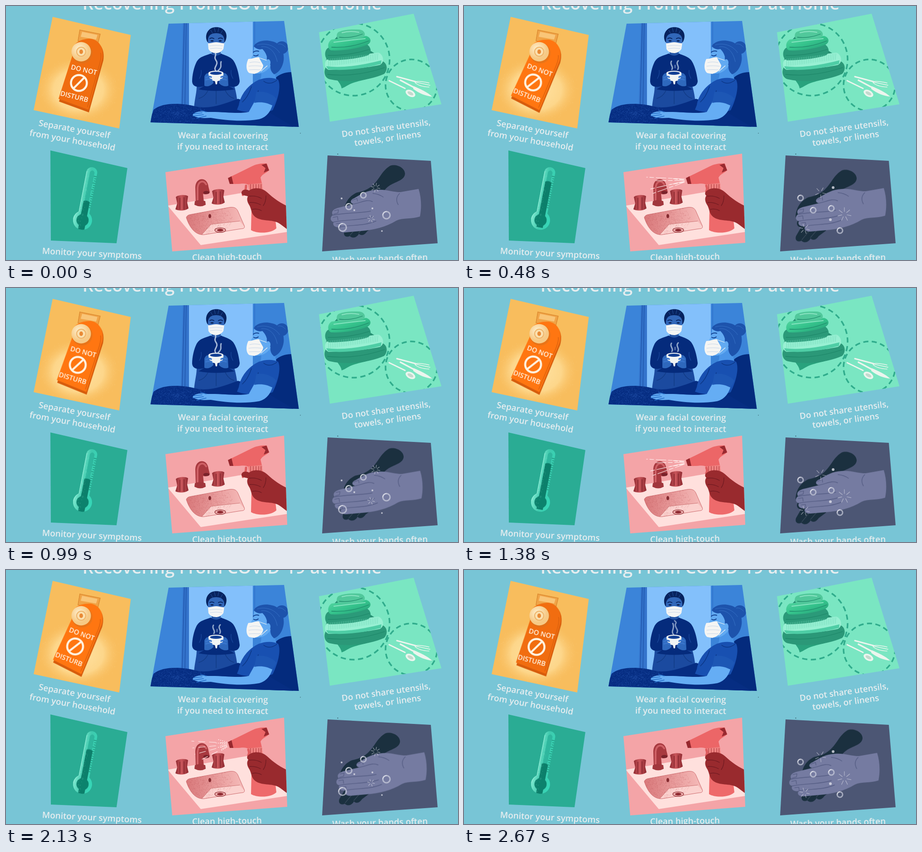
These frames come from a looping animation (998 by 561 pixels, 2.7 s). An HTML page:

```html
<!DOCTYPE html>
<html lang="en">
<head>
<meta charset="utf-8">
<title>Recovering at Home</title>
<style>
html, body { margin: 0; width: 100%; height: 100%; overflow: hidden; background: #78c5d6; }
svg { display: block; width: 100vw; height: 100vh; }
text { font-family: "Open Sans", "Noto Sans", sans-serif; text-anchor: middle; }
.cap { font-size: 18.9px; font-weight: 600; fill: #e6edef; }
.title { font-size: 38.3px; font-weight: 600; fill: #e6edef; }
.sign text { font-size: 15px; font-weight: 600; fill: #fff3e2; }
.line { fill: none; stroke-linecap: round; stroke-linejoin: round; }

.sign, .front, .back, .level, .dash, .third, .rest, .half, .early, .late {
  animation: 900ms infinite;
}
.sign { transform-origin: 166px 101px; animation-name: swing; animation-timing-function: steps(10); }
.face { animation: 900ms infinite glow; }
.front { animation-name: front; animation-timing-function: steps(15); }
.back { animation-name: back; animation-timing-function: steps(15); }
.level { animation-name: level; animation-timing-function: steps(15); }
.dash { stroke-dasharray: .6 .4; animation-name: dash; animation-timing-function: steps(30); }
.third, .rest, .half, .early, .late { animation-timing-function: step-end; }
.third { animation-name: third; }
.rest { animation-name: rest; }
.half { animation-name: half; }
.early { animation-name: early; animation-delay: -600ms; }
.late { animation-name: late; animation-delay: -600ms; }
.d1 { animation-delay: -600ms; }
.d2 { animation-delay: -300ms; }
.off { animation-delay: -450ms; }

@keyframes swing { 33.333%, 66.667% { transform: rotate(7deg); } }
@keyframes glow { 0%, to { fill: #f06d10; } 12%, 88% { fill: #ff7611; } }
@keyframes front { 50% { transform: translate(17px, -2px); } }
@keyframes back { 50% { transform: translate(-15px, 11px); } }
@keyframes level { 50% { transform: translateY(-47px); } }
@keyframes dash { to { stroke-dashoffset: -1; } }
@keyframes third { 0% { opacity: 1; } 33.333%, to { opacity: 0; } }
@keyframes rest { 0% { opacity: 0; } 33.333%, to { opacity: 1; } }
@keyframes half { 0% { opacity: 1; } 50%, to { opacity: 0; } }
@keyframes early { 0% { opacity: 1; } 10%, to { opacity: 0; } }
@keyframes late { 0% { opacity: 0; } 10% { opacity: 1; } 33.333%, to { opacity: 0; } }
</style>
</head>
<body>
<svg viewBox="0 0 998 561" preserveAspectRatio="none">
<defs>
  <clipPath id="c1"><polygon id="p1" points="103,24 275.500,64 250,270.500 61,230"/></clipPath>
  <clipPath id="c2"><polygon id="p2" points="359,39 614,33 646.500,267 319,257"/></clipPath>
  <clipPath id="c3"><polygon id="p3" points="691,58 900,17 961.500,217 715,255.500"/></clipPath>
  <clipPath id="c4"><polygon id="p4" points="98,319 268,358 244,524 99,518"/></clipPath>
  <clipPath id="c5"><polygon id="p5" points="352,367 614,326 621,523 367,542"/></clipPath>
  <clipPath id="c6"><polygon id="p6" points="710,330 938,342 953,524 698,542"/></clipPath>
  <clipPath id="tube"><path id="tubeShape" d="M-12 -107A12 12 0 0 1 12 -107V-17A21 21 0 1 1 -12 -17Z"/></clipPath>
  <clipPath id="basin"><path id="basinShape" d="M398 467C400 462 404 461 410 460L492 445C503 443 509 446 512 453L526 485C528 490 525 492 519 492L438 505C420 507 406 492 398 467Z"/></clipPath>
  <clipPath id="quilt"><path id="quiltShape" d="M315 260L326 229C344 213 387 213 420 222C450 229 482 216 512 205L548 215L640 270Z"/></clipPath>
  <radialGradient id="warm"><stop offset="0" stop-color="#ffe3a4"/><stop offset=".6" stop-color="#fdd68a"/><stop offset="1" stop-color="#f8bd5d" stop-opacity="0"/></radialGradient>
  <radialGradient id="knob" cx=".4" cy=".35"><stop offset="0" stop-color="#fff0cf"/><stop offset="1" stop-color="#f6c985"/></radialGradient>
  <linearGradient id="glass"><stop offset="0" stop-color="#7be8cf"/><stop offset=".45" stop-color="#3fc9ad"/><stop offset="1" stop-color="#35d8b8"/></linearGradient>
  <linearGradient id="bowl"><stop offset="0" stop-color="#d9797b"/><stop offset="1" stop-color="#f6bcba"/></linearGradient>
  <linearGradient id="metal"><stop offset="0" stop-color="#8e2930"/><stop offset=".45" stop-color="#c9565b"/><stop offset="1" stop-color="#8e2930"/></linearGradient>
  <linearGradient id="towel" x2="1" y2="1"><stop offset="0" stop-color="#59d9a5"/><stop offset=".5" stop-color="#35c38c"/><stop offset="1" stop-color="#239b75"/></linearGradient>
</defs>
<rect width="998" height="561" fill="#78c5d6"/>
<text class="title" x="499" y="8">Recovering From COVID-19 at Home</text>

<!-- door sign -->
<use href="#p1" fill="#f8bd5d"/>
<g clip-path="url(#c1)">
  <ellipse cx="160" cy="185" rx="92" ry="74" fill="url(#warm)"/>
  <g id="glowGrain"></g>
  <path d="M163 53L208 62L202 86L159 77Z" fill="#f0a447" stroke="#dc8a31" stroke-width="1.5"/>
  <path d="M168 57L202 64L199 74L165 68Z" fill="#f9c578"/>
  <g class="sign">
    <path d="M117 211L148 112C143 92 154 77 185 75C207 76 219 95 215 120L183 235Z" fill="#d75c0c"/>
    <path class="face" d="M116 205L147 108C143 90 154 74 184 72C205 73 217 92 213 116L182 229Z" fill="#f06d10"/>
    <path class="line" d="M209 104C211 112 208 124 205 134L180 223" stroke="#da600d" stroke-width="1.5"/>
    <text transform="translate(171 146) rotate(13)">DO NOT</text>
    <text transform="translate(149.500 205) rotate(14)">DISTURB</text>
    <g class="line" stroke="#fff3e2" stroke-width="4.500"><circle cx="161" cy="170" r="17.500"/><path d="M173 158L149 182"/></g>
  </g>
  <ellipse cx="168" cy="104" rx="23" ry="23" fill="#d8741f" opacity=".55"/>
  <circle cx="166" cy="101" r="21.500" fill="url(#knob)"/>
  <circle cx="166" cy="101" r="10" fill="#fbe0af" stroke="#eeb469" stroke-width="2"/>
  <ellipse cx="166" cy="101" rx="4" ry="5" fill="#e98a36"/>
</g>

<!-- caregiver and patient -->
<use href="#p2" fill="#3b84d9"/>
<g clip-path="url(#c2)">
  <rect x="404" y="30" width="141" height="200" fill="#83c0fb"/>
  <path d="M391 30H404V224H386Z" fill="#3474cc"/>
  <path class="line" d="M394 30L389 222M398 30L395 222" stroke="#1f56ac" stroke-width="1.5"/>
  <path class="line" d="M549 30V130" stroke="#2f70c8" stroke-width="1.5"/>
  <path d="M421 176C421 195 416 205 415 230H512C511 205 508 190 504 176Z" fill="#1b4a9f"/>
  <path class="line" d="M447 184C442 196 434 202 426 204M483 184C488 196 496 202 503 204M464 186V216" stroke="#123b86" stroke-width="1.5"/>
  <path d="M452 105C440 110 428 111 421 123C415 135 411 152 411 167C412 180 426 180 437 177L425 184C450 189 480 188 505 184L492 177C506 181 515 177 516 166C514 148 508 126 500 118C492 110 482 109 475 105C470 109 458 109 452 105Z" fill="#052b7c"/>
  <path class="line" d="M431 142C432 150 430 154 427 160M497 142C496 150 498 154 501 160" stroke="#1a489c" stroke-width="1.3"/>
  <path d="M454 95H474V106C468 111 459 110 454 106Z" fill="#2556a6"/>
  <path d="M445 80C439 70 442 58 449 52C456 45 473 45 480 52C488 58 489 70 483 80Z" fill="#07235f"/>
  <path d="M446 74C447 64 454 60 464 60C474 60 481 64 482 74C483 92 474 103 464 104C454 103 445 92 446 74Z" fill="#3167b9"/>
  <path class="line" d="M452 53L456 60M460 48L462 57M470 48L468 57M478 54L474 61" stroke="#2c5caa" stroke-width=".8"/>
  <path class="line" d="M450 72Q454 69 459 72M469 72Q474 69 478 72" stroke="#07235f" stroke-width="2"/>
  <path d="M451 77Q455 74 459 77Q455 80 451 77M469 77Q473 74 477 77Q473 80 469 77" fill="#061b4c"/>
  <path d="M446 82C452 83 458 80 464 80C470 80 476 83 482 82L480 95C475 102 469 104 464 104C457 104 450 101 447 95Z" fill="#f4f5f4"/>
  <path class="line" d="M450 88Q464 86 478 88M451 94Q464 92 477 94" stroke="#c6d5e8" stroke-width="1"/>
  <path d="M438 156C440 149 448 145 455 150L458 170C452 177 443 179 438 176Z" fill="#2e68bd"/>
  <path d="M490 156C488 149 480 145 474 150L470 170C476 177 485 179 491 176Z" fill="#2e68bd"/>
  <path d="M447 148H480C481 158 476 165 467 166H461C452 165 447 158 447 148Z" fill="#f1f4f4"/>
  <ellipse cx="463.500" cy="148" rx="16.500" ry="5" fill="#f8f8f5"/>
  <ellipse cx="463.500" cy="148.500" rx="13" ry="3.500" fill="#123f94"/>
  <path class="line" d="M442 158Q448 154 453 157M442 163Q448 160 454 163M486 157Q480 154 475 157M486 163Q480 160 474 163" stroke="#3975cc" stroke-width="3.500"/>
  <path d="M461 165H467L466 173H463Z" fill="#f1f4f4"/>
  <g class="line" stroke="#dce8f5" stroke-width="3">
    <g class="third"><path d="M464 144C455 135 472 130 463 119C458 112 466 109 462 104" opacity=".75"/><path d="M468 143C479 134 472 129 475 123" opacity=".7"/></g>
    <g class="third d1"><path d="M459 140C464 134 453 129 458 122M472 140C477 133 466 128 473 121" opacity=".65"/><path d="M466 136V131" opacity=".4"/></g>
    <g class="third d2"><path d="M463 143C455 135 467 129 461 118" opacity=".6"/><path d="M470 139C475 131 464 127 467 119C470 116 467 114 465 112" opacity=".55"/></g>
  </g>
  <path d="M582 190C585 163 600 147 630 146L660 150V270H550Z" fill="#042b7d"/>
  <use href="#quiltShape" fill="#062d82"/>
  <g id="quiltGrain" clip-path="url(#quilt)"></g>
  <circle cx="609" cy="92" r="14" fill="#1d53ac"/>
  <path d="M558 130L594 119C591 139 594 154 598 164L558 168C564 159 565 151 562 142Z" fill="#4a95e8"/>
  <path d="M548 89C552 82 570 80 579 88L588 125C581 143 566 151 549 149L536 143L541 116L546 105Z" fill="#62aaf2"/>
  <path d="M547 89C551 79 570 73 587 78C607 82 615 100 613 120C611 134 604 146 592 151C585 145 583 139 584 130C578 127 575 121 576 112C574 104 570 99 566 95C560 97 552 95 547 89Z" fill="#1d53ac"/>
  <path class="line" d="M555 86C570 81 592 85 604 103M564 90C580 88 594 99 599 123M601 84Q610 82 617 91" stroke="#3975c9" stroke-width=".9"/>
  <path class="line" d="M546 102Q551 98 558 100M547 109Q552 112 557 108" stroke="#12408f" stroke-width="2"/>
  <path class="line" d="M558 114L578 121M563 144L579 130" stroke="#f2f4f4" stroke-width="1.200"/>
  <ellipse cx="579" cy="125" rx="5" ry="7.500" fill="#62aaf2"/>
  <path d="M535 117C543 117 551 113 558 113L568 131C567 141 560 147 548 150L537 148C529 142 530 127 535 117Z" fill="#f5f5f3"/>
  <path class="line" d="M538 125Q549 122 561 125M536 133Q549 131 564 133M537 141Q549 140 561 141" stroke="#c6d5e8" stroke-width="1"/>
  <path d="M514 219C518 195 535 174 558 163C573 158 588 157 601 163C608 178 600 208 589 230C567 239 532 237 510 229Z" fill="#1850b1"/>
  <path class="line" d="M542 178C537 193 530 205 522 212M557 187C553 202 557 210 555 216M569 166Q582 176 598 164" stroke="#0b3685" stroke-width="1.5"/>
  <path d="M551 207L590 212C586 231 577 245 559 250C525 256 485 253 452 247C437 248 421 248 412 241C416 233 430 231 445 234C480 233 512 239 536 234Z" fill="#65adf4"/>
  <path class="line" d="M414 238L433 236M413 243L436 240M421 248L442 243M442 234L429 230" stroke="#246bc6" stroke-width="1.5"/>
  <path d="M553 190C567 187 589 193 597 205L589 220C575 213 563 211 548 214Z" fill="#1d57b5"/>
</g>

<!-- towels and cutlery -->
<use href="#p3" fill="#7ae6c2"/>
<g clip-path="url(#c3)">
  <g fill="none" stroke="#30ac8c" stroke-width="3.500">
    <circle class="dash" cx="767" cy="118" r="80" pathLength="26"/>
    <circle class="dash" cx="895" cy="175" r="57" pathLength="19"/>
  </g>
  <path d="M727 157L820 151C809 161 781 164 763 171C753 175 748 180 741 182C740 173 733 167 727 157Z" fill="#29a27d"/>
  <path d="M734 64L720 80L710 100L706 125L708 150L760 160L832 140L826 112L800 96L794 74Z" fill="#268f72"/>
  <path d="M707 134C700 144 703 160 716 162C757 171 807 163 835 150C844 141 842 126 831 122Z" fill="#2b9878"/>
  <path d="M711 116C702 122 702 137 712 141C750 141 795 137 826 130C837 124 833 106 822 103Z" fill="#98f0d3"/>
  <path d="M707 133Q755 139 829 120L828 128Q765 145 711 140Z" fill="#4ecda5"/>
  <path d="M712 92C702 97 702 116 713 120C745 120 778 116 799 109C810 102 805 88 794 83Z" fill="#2b9a79"/>
  <path d="M719 74C709 80 709 95 718 98C746 99 776 94 797 86C809 80 806 69 795 66Z" fill="url(#towel)"/>
  <path d="M735 57C728 61 729 72 737 75C756 76 775 74 789 69C796 63 791 53 780 52C763 51 747 52 735 57Z" fill="#51c89b"/>
  <g class="line" stroke="#1d8668" stroke-width="1.3">
    <path d="M736 69Q761 72 787 62M719 91Q758 94 801 77M711 109Q757 110 802 96M710 151Q770 158 836 136"/>
  </g>
  <g class="line" stroke="#a7f1d6" stroke-width="2" opacity=".7"><path d="M742 59Q759 54 779 58M724 80Q758 76 793 72"/></g>
  <g id="weave" class="line" stroke="#6ed7b6" stroke-width=".8"></g>
  <g class="line" stroke="#ecf5ee" stroke-width="3">
    <path d="M863 156L904 167"/><path d="M902 167Q915 165 934 170M904 168L936 175M903 169Q912 178 934 179" stroke-width="1.600"/>
    <path d="M846 165L881 182"/><path d="M871 164L901 180" stroke-width="3.600"/>
  </g>
  <path d="M900 177C914 183 930 190 941 200C927 199 912 193 899 183Z" fill="#ecf5ee"/>
  <ellipse cx="893" cy="193" rx="11.500" ry="7" fill="#ecf5ee" transform="rotate(28 893 193)"/>
  <ellipse cx="893" cy="193" rx="7" ry="3.500" fill="#c3d9cd" transform="rotate(28 893 193)"/>
</g>

<!-- thermometer -->
<use href="#p4" fill="#2aac94"/>
<g transform="translate(169 473) rotate(11)">
  <use href="#tubeShape" fill="url(#glass)"/>
  <g clip-path="url(#tube)">
    <path d="M-4 -108Q1 -116 6 -108V0H-4Z" fill="#2fb79e"/>
    <g class="level"><path d="M-6 -42Q1 -46 8 -42V60H-6Z" fill="#0c7f6b"/></g>
    <circle r="13.500" fill="#0c826d"/>
    <g id="mercuryGrain"></g>
    <path d="M-12 -107V-18Q-20 -12 -21 0" class="line" stroke="#a3f3df" stroke-width="3" opacity=".6"/>
  </g>
  <g id="ticks" stroke="#167f6b" stroke-width="1.200"></g>
</g>

<!-- sink and spray -->
<use href="#p5" fill="#f4a4a7"/>
<g clip-path="url(#c5)">
  <path d="M357 441L532 411L640 472V496L430 528Z" fill="#ffe0dd"/>
  <use href="#basinShape" fill="url(#bowl)"/>
  <g clip-path="url(#basin)">
    <path d="M430 508L453 482L516 475L530 492Z" fill="#fbd1ce"/>
    <g id="sinkGrain"></g>
    <path d="M453 482L432 505M453 482L516 475" class="line" stroke="#ce7777" stroke-width="1"/>
  </g>
  <use href="#basinShape" fill="none" stroke="#cc6b6e" stroke-width="1"/>
  <ellipse cx="450" cy="464" rx="3" ry="4.500" fill="#852b30"/>
  <ellipse cx="473" cy="495" rx="12" ry="5" fill="#eeb0af" stroke="#9b3c40" stroke-width="1.3"/>
  <ellipse cx="473" cy="495" rx="7" ry="3" fill="#8e2930"/>
  <g id="tap">
    <path d="M375 422C379 417 397 416 402 420L400 434L403 447C394 453 382 453 374 449L378 436Z" fill="url(#metal)"/>
    <path class="line" d="M384 424V449M393 423V449" stroke="#82242b" stroke-width="1.600"/>
  </g>
  <use href="#tap" x="80" y="-13"/>
  <path d="M419 434L418 400C419 377 445 377 447 399L450 411Q443 418 435 415L434 404L437 434Z" fill="#a8393f"/>
  <path class="line" d="M423 429V401C425 386 436 384 442 394" stroke="#ce6065" stroke-width="4"/>
  <path d="M417 431Q428 426 440 431L441 439Q429 446 416 439Z" fill="#a1363c"/>
  <ellipse cx="442.500" cy="412" rx="7" ry="3.500" fill="#79222a"/>
  <path d="M543 404H566L594 466L597 491C585 503 554 503 541 495Z" fill="#ee6a6b"/>
  <path d="M496 377L543 354C554 348 568 347 576 348L581 363C576 368 566 371 562 379L566 396H536C529 389 517 394 501 393Z" fill="#ec6667"/>
  <path d="M564 351L575 348L581 363L569 368L573 358Z" fill="#992a30"/>
  <path d="M490 380L498 376L502 393L494 393Z" fill="#97282e"/>
  <path d="M534 394L565 391L567 405L537 407Z" fill="#f08482"/>
  <path class="line" d="M540 394V405M546 394V405M552 394V405M558 394V405M563 394V404" stroke="#bb484b" stroke-width="1.5"/>
  <g class="third">
    <path class="line" d="M530 397Q530 409 523 417" stroke="#df5c5e" stroke-width="5"/>
    <path d="M537 408C529 403 519 406 520 414C522 420 532 418 538 422Z" fill="#992a2e"/>
  </g>
  <path class="line rest" d="M535 397Q538 404 535 409" stroke="#df5c5e" stroke-width="5"/>
  <path d="M535 409C545 399 566 401 576 411C591 425 606 436 630 446V500L606 482C591 470 567 477 552 467C540 459 543 448 536 438C531 429 532 423 535 419C531 416 532 411 535 409Z" fill="#992a2e"/>
  <path class="line" d="M537 420Q552 418 564 425M538 434Q551 433 562 439M544 449Q555 447 564 452M574 419Q574 433 568 441" stroke="#6f1a21" stroke-width="1.3"/>
  <g class="line" stroke="#fff0ef">
    <g class="late" stroke-width="1.100" opacity=".9">
      <path d="M487 382L403 378M487 385L421 386M487 387L408 405M487 389L417 414" stroke-dasharray="22 5 9 5"/>
      <path d="M485 384L460 381M485 389L456 394" stroke-width="1.600" stroke-dasharray="9 5"/>
    </g>
    <g class="early" stroke-width="1.100">
      <path d="M487 382L410 378M487 386L412 393M487 388L417 407M488 390L433 418" stroke-dasharray="14 10"/>
      <path d="M487 380L467 374M487 384L464 382M487 388L467 392M488 391L474 400" stroke-width="1.600" stroke-dasharray=".5 4"/>
    </g>
  </g>
</g>

<!-- hand washing -->
<use href="#p6" fill="#4c5674"/>
<g clip-path="url(#c6)">
  <g class="back">
    <path d="M848 353C862 348 880 357 881 370C881 379 873 384 862 389C845 396 835 403 830 420L813 486L797 498C791 507 784 508 779 503C775 512 764 514 759 508C751 512 744 508 747 498L758 479C750 477 746 471 752 462L746 456C747 437 756 420 775 412C802 407 813 395 826 376C834 364 840 358 848 353Z" fill="#1b303f"/>
    <path class="line" d="M779 501L793 485M760 506L775 488" stroke="#394a5b" stroke-width="1.3"/>
  </g>
  <g class="front">
    <path d="M911 404C917 423 918 445 914 465C896 471 877 467 862 474C839 488 812 495 783 497L749 500C738 501 733 494 738 488C727 491 719 483 724 477C715 476 715 465 722 462C717 455 722 449 732 446L769 437C759 437 759 428 768 425C785 415 797 407 818 406C838 404 853 411 871 411Z" fill="#757ba1"/>
    <path class="line" d="M769 437C785 434 797 426 809 432M722 462C751 456 780 458 805 453M724 477C751 471 783 474 810 465M738 488C764 483 791 486 817 475M869 414C860 423 862 432 866 439M810 414Q823 415 833 422" stroke="#555d84" stroke-width="1.400"/>
    <path class="line" d="M725 452L734 450L733 457L723 460M722 467L732 465L733 473M729 481L738 480L739 487M764 429L775 425L776 431" stroke="#4f577d" stroke-width="1.100"/>
  </g>
  <g class="half" id="foamA"></g>
  <g class="half off" id="foamB"></g>
</g>

<g class="cap">
  <text transform="translate(150 278.500) rotate(10)">Separate yourself</text>
  <text transform="translate(145.500 303) rotate(10)">from your household</text>
  <text transform="translate(479 292.500) rotate(.3)">Wear a facial covering</text>
  <text transform="translate(478.500 317.500) rotate(.3)">if you need to interact</text>
  <text transform="translate(840 276) rotate(-8)">Do not share utensils,</text>
  <text transform="translate(843.500 299) rotate(-8)">towels, or linens</text>
  <text transform="translate(189.500 553) rotate(3)">Monitor your symptoms</text>
  <text transform="translate(488 561) rotate(-1)">Clean high-touch</text>
  <text transform="translate(826 565) rotate(-1.700)">Wash your hands often</text>
</g>
<g fill="#31525e"><circle cx="650" cy="281" r=".8"/><circle cx="732.500" cy="327" r="1"/></g>
</svg>
<script>
const fill = (id, html) => { document.getElementById(id).innerHTML = html; };
const list = (n, fn) => Array.from({ length: n }, (_, i) => fn(i)).join("");

let seed = 11;
const rand = () => (seed = seed * 16807 % 2147483647) / 2147483647;

// Soft stipple, densest at the centre of an ellipse.
function grain(id, n, cx, cy, rx, ry, color, opacity) {
  const d = list(n, () => {
    const a = rand() * Math.PI * 2, r = Math.pow(rand(), .7);
    return `M${(cx + rx * r * Math.cos(a)).toFixed(1)} ${(cy + ry * r * Math.sin(a)).toFixed(1)}h.8`;
  });
  fill(id, `<path d="${d}" stroke="${color}" stroke-width=".8" opacity="${opacity}"/>`);
}
grain("glowGrain", 500, 162, 185, 90, 74, "#ffecc0", .35);
grain("quiltGrain", 1100, 375, 237, 70, 25, "#3f75d0", .5);
grain("mercuryGrain", 220, -10, -30, 9, 85, "#a5f2df", .5);
grain("sinkGrain", 650, 438, 470, 62, 35, "#b84e53", .55);

fill("ticks", list(15, i => `<path d="M${i % 3 ? 8 : 6} ${-100 + i * 5}H12"/>`));
fill("weave", list(28, i => {
  const x = 713 + i * 4, y = 117 - i * .45;
  return `<path d="M${x} ${y}l-1 ${16 - i * .1}"/>`;
}));

const ring = (x, y, r) => `<circle cx="${x}" cy="${y}" r="${r}" fill="none" stroke="#d3d5e3" stroke-width="3" opacity=".65"/>
  <path class="line" d="M${x - r} ${y}A${r} ${r} 0 0 1 ${x} ${y - r}" stroke="#fff" stroke-width="1.5" opacity=".6"/>`;
const dot = (x, y, r = 2) => `<circle cx="${x}" cy="${y}" r="${r}" fill="#dfe0e9" opacity=".8"/>`;
const star = (x, y, r, n = 8) => `<g class="line" stroke="#dedfe9" stroke-width="1.200" opacity=".6">` +
  list(n, i => `<path d="M${r * .4} 0H${r}" transform="translate(${x} ${y}) rotate(${i * 360 / n + 12})"/>`) + "</g>";

fill("foamA", ring(757, 443, 6.5) + ring(789, 418, 6) + ring(840, 462, 8) + ring(743, 489, 8.5) +
  dot(741, 425) + dot(769, 451) + dot(809, 447) + dot(830, 497, 1.8) +
  star(816, 401, 10) + star(806, 470, 8, 6));
fill("foamB", ring(743, 424, 6) + ring(771, 451, 6) + ring(811, 447, 6) + ring(830, 496, 6) +
  dot(815, 401, 3) + dot(809, 472, 3) +
  star(840, 460, 15, 7) + star(787, 412, 12, 5) + star(752, 492, 11, 6));
</script>
</body>
</html>
```
